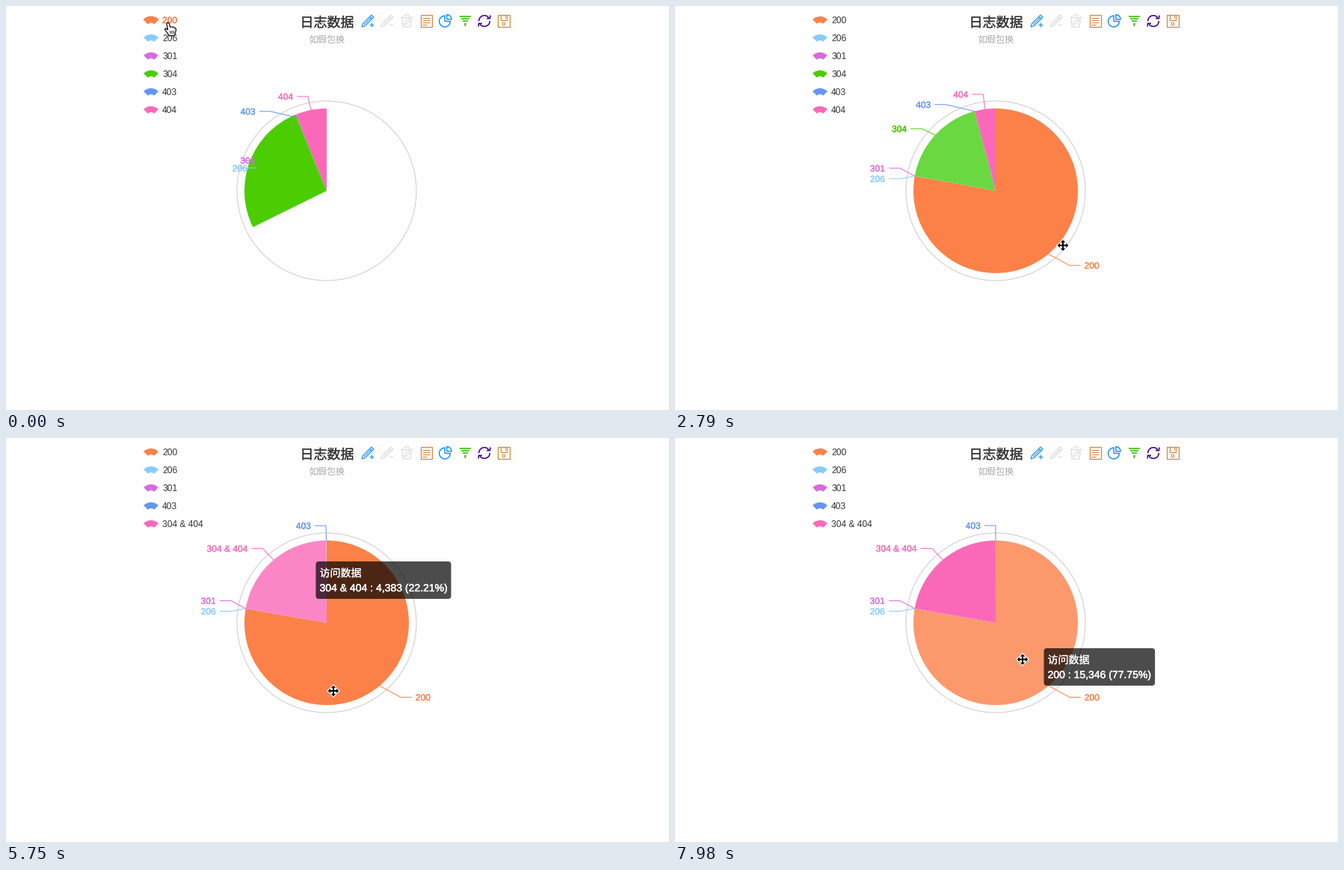
Animation of 887x540 px, one loop 8 s. Source, as a matplotlib script:

```python
import numpy as np
import matplotlib.pyplot as plt
from matplotlib import patheffects
from matplotlib.animation import FuncAnimation
from matplotlib.lines import Line2D
from matplotlib.patches import Circle, FancyBboxPatch, Polygon, Wedge

W, H, DPI = 887, 540, 64
PT = 72 / DPI                      # points per pixel
LOOP, INTERVAL, STEP = 8000, 40, 147.5
CX, CY, R = 429, 247, 110
SANS, CJK = "Liberation Sans", "Noto Sans CJK JP"

NAMES = ["200", "206", "301", "304", "403", "404"]
MERGED = "304 & 404"
COLORS = dict(zip(NAMES, ["#fb8148", "#89cbfc", "#d46ddb", "#4bcd02", "#6495f2", "#fa69b8"]))
COLORS[MERGED] = COLORS["404"]
LIGHT = {"200": "#fb996d", "304": "#6ad840", "404": "#fb86c6", MERGED: "#fb86c6"}

DATA = dict(zip(NAMES, [15346, 3, 2, 3549, 4, 834]))
TOTAL = sum(DATA.values())
VIEWS = {"all": DATA,
         "no200": {**DATA, "200": 0},
         "no404": {**DATA, "404": 0},
         "merged": {**DATA, "304": DATA["304"] + DATA["404"], "404": 0}}
CHANGES = [(-10, "all", "no200"), (590, "no200", "all"), (1900, "all", "no404"),
           (2540, "no404", "all"), (5440, "all", "merged")]

# Pointer stops (step, x, y) and hovered items (first step, last step, name)
STOPS = np.array([
    (0, 219.5, 31), (4, 219.5, 30), (8, 219.5, 132), (12, 219.5, 151), (13, 219.5, 146),
    (18, 219.5, 146), (19, 519, 320), (29, 420, 178), (31, 420, 178), (34, 394, 187),
    (37, 394, 187), (39, 438, 338), (44, 239.5, 120), (46, 239.5, 120), (50, 460, 352),
    (52, 473, 303), (53, 473, 303), (54, 465, 296)])
LEGEND_HOVER = [(0, 4, "200"), (13, 18, "404"), (43, 46, MERGED)]
SLICE_HOVER = [(19, 19, "304"), (20, 26, "200"), (27, 36, "404"),
               (37, 48, MERGED), (49, 54, "200")]
DRAG = (31, 36)

fig = plt.figure(figsize=(W / DPI, H / DPI), dpi=DPI, facecolor="#fefefe")
ax = fig.add_axes([0, 0, 1, 1])
ax.set_xlim(0, W)
ax.set_ylim(H, 0)
ax.axis("off")
live = []


def add(artist, z=1):
    artist.set_zorder(z)
    ax.add_artist(artist)
    live.append(artist)


def line(pts, color, lw=1.0, closed=False):
    pts = list(pts) + ([pts[0]] if closed else [])
    x, y = zip(*pts)
    add(Line2D(x, y, color=color, lw=lw * PT, solid_capstyle="butt", solid_joinstyle="miter"))


def shape(kind, *args, fill="none", edge="none", lw=0.0, **kw):
    add(kind(*args, facecolor=fill, edgecolor=edge, linewidth=lw * PT, **kw))


def text(x, y, s, size=12, color="#333", font=SANS, ha="left", heavy=0.0, z=1):
    t = ax.text(x, y, s, fontsize=size * PT, color=color, family=font, ha=ha,
                va="baseline", zorder=z)
    if heavy:
        t.set_path_effects([patheffects.withStroke(linewidth=heavy * PT, foreground=color)])
    live.append(t)
    return t


def arc(x, y, r, a, b):
    t = np.radians(np.linspace(a, b, 30))
    return list(zip(x + r * np.cos(t), y + r * np.sin(t)))


def box(x, y, w, h):
    return [(x, y), (x + w, y), (x + w, y + h), (x, y + h)]


def shift(pts, x, y):
    return [(x + px, y + py) for px, py in pts]


# ---- toolbar and title -------------------------------------------------

def pen(x, color, plus):
    line(shift([(-8, 8), (-6.5, 3.5), (5, -8), (8, -5), (-3.5, 6.5)], x, 20), color, 1.2, True)
    line(shift([(-5, 5), (5.5, -5.5)], x, 20), color)
    line(shift([(2.5, -5.5), (5.5, -2.5)], x, 20), color)
    line(shift([(2, 5), (8, 5)], x, 20), color, 1.2)
    if plus:
        line(shift([(5, 2), (5, 8)], x, 20), color, 1.2)


def trash(x, color):
    line(shift([(-8, -5.5), (8, -5.5)], x, 20), color, 1.4)
    line(shift([(-3.5, -6), (-2.5, -8.2), (2.5, -8.2), (3.5, -6)], x, 20), color, 1.2)
    line(shift([(-6.2, -5.5), (-5, 8), (5, 8), (6.5, -5.5)], x, 20), color, 1.3)
    line(shift([(-3.5, 5), (-2.5, 2), (2.5, -3), (4.8, -0.8), (-0.5, 4.2)], x, 20),
         color, 1.1, True)


def toolbar():
    blue, gray, tan = "#1e90ff", "#dddddd", "#d58a45"
    green, indigo = "#5cc636", "#4b0082"
    pen(484, blue, True)
    pen(510, gray, False)
    trash(536, gray)

    line(box(554.5, 12, 15, 16), tan, 1.3, True)
    for k in range(4):
        line([(557, 15.5 + 3 * k), (567 - 4 * (k == 3), 15.5 + 3 * k)], tan, 1.2)

    for x, y, r, a, b in ((587, 20.5, 7.4, 0, 270), (589.8, 17.8, 6.2, -90, 0)):
        line([(x, y)] + arc(x, y, r, a, b), blue, 1.5, True)

    for k in range(4):
        half = 7.6 - 1.95 * k
        line([(614.3 - half, 13.6 + 3.4 * k), (614.3 + half, 13.6 + 3.4 * k)], green, 2)
    shape(Circle, (614.3, 26), 1.2, fill=green)

    head = [(8, -7.5), (7.4, -3.2), (3, -3.4)]
    for s in (1, -1):
        for pts in (arc(0, 0, 7.3, 180, 325), head):
            line([(640 + s * x, 20 + s * y) for x, y in pts], indigo, 1.6)

    line(box(658, 12, 16, 16), tan, 1.3, True)
    line(box(662, 12, 8, 6.5), tan, 1.2, True)
    line([(667.5, 12.5), (667.5, 16)], tan)
    line(arc(666, 24, 1.9, 0, 360), tan, 1.2)


text(393.5, 28, "日志数据", 18, "#333", CJK, heavy=0.2)
text(405, 48.3, "如假包换", 12, "#aaa", CJK)
toolbar()
shape(Circle, (CX, CY), 120, edge="#cccccc", lw=1)
live.clear()


# ---- chart layout ------------------------------------------------------

def polar(a, r):
    t = np.radians(a)
    return CX + r * np.sin(t), CY - r * np.cos(t)


def spread(y, gap=14):
    """Move sorted label heights apart, sharing each push with the labels above."""
    for i in range(1, len(y)):
        push = y[i - 1] + gap - y[i]
        if push <= 0:
            continue
        for j in range(i, len(y)):
            y[j] += push
            if j > i and j + 1 < len(y) and y[j + 1] > y[j] + gap:
                break
        for k in range(j, -1, -1):
            y[k] -= push / 2
            if k and y[k] > y[k - 1] + gap:
                break
    return y


def layout(values):
    """Slice edges in degrees; leader points plus text anchor, and side, per label."""
    amounts = list(values.values())
    edges = np.concatenate([[0], np.cumsum(amounts)]) / TOTAL
    edges *= 360 / edges[-1]
    mids = (edges[1:] + edges[:-1]) / 2
    sides = np.where(mids < 180, 1, -1)
    heights = np.array([polar(m, 130)[1] for m in mids])
    for side in (1, -1):
        group = [i for i, v in enumerate(amounts) if v and sides[i] == side]
        group.sort(key=lambda i: heights[i])
        heights[group] = spread(list(heights[group]))

    labels = []
    for mid, y, side in zip(mids, heights, sides):
        dx, dy = abs(polar(mid, 130)[0] - CX) + 20, abs(y - CY)
        if dy < 125:
            dx = max(dx, np.sqrt((150 + 5 * side) ** 2 - dy ** 2))
        labels.append([polar(mid, R)] + [(CX + side * (dx - back), y) for back in (20, 5, 0)])
    return edges, np.array(labels), sides


LAYOUTS = {view: layout(values) for view, values in VIEWS.items()}


def chart_state(t):
    start, old, new = [c for c in CHANGES if c[0] <= t][-1]
    p = (t - start) / 500
    f = 1 - 2 ** (-10 * p) if p < 1 else 1
    (e0, l0, _), (e1, l1, sides) = LAYOUTS[old], LAYOUTS[new]
    return new, e0 + (e1 - e0) * f, l0 + (l1 - l0) * f, sides


def pointer(step):
    return np.array([np.interp(step, STOPS[:, 0], STOPS[:, k]) for k in (1, 2)])


def during(step, spans):
    """First step and name of the span holding the given step."""
    return next(((a, name) for a, b, name in spans if a <= step <= b), (0, None))


# ---- moving parts ------------------------------------------------------

def legend(view, hover):
    names = NAMES[:3] + ["403", MERGED] if view == "merged" else NAMES
    for row, name in enumerate(names):
        y, hot = 18.6 + 24 * row, name == hover
        off = VIEWS[view].get(name) == 0
        color = "#cccccc" if off and not hot else COLORS[name]
        shape(Wedge, (194, y + 9.4), 14, 225, 315, width=8,
              fill=color, edge=color if hot else "none", lw=1)
        text(209, y + 4.4, name, color=color if hot or off else "#333", heavy=0.5 * hot)


def pie(step, view, edges, labels, sides, hover):
    shown = [MERGED if view == "merged" and n == "304" else n for n in NAMES]
    active = [i for i, v in enumerate(VIEWS[view].values()) if v]
    spans = list(zip(edges[:-1] - 90, edges[1:] - 90))
    fills = [(LIGHT if n == hover else COLORS)[n] for n in shown]
    dragging = DRAG[0] <= step <= DRAG[1]

    for i in active:
        if not (dragging and shown[i] == "404") and spans[i][1] - spans[i][0] > 0.01:
            shape(Wedge, (CX, CY), R, *spans[i], fill=fills[i])

    for i in active:
        name, pts = shown[i], labels[i]
        hot = name == MERGED and 43 <= step <= 48
        line(pts[:3], COLORS[name])
        if hot:
            line(pts[:2], "#ffa040")
        x, y = pts[3]
        text(x, y + 4.3, name, color=COLORS[name], ha="left" if sides[i] > 0 else "right",
             heavy=0.5 if hot or name == "304" else 0.25)

    if dragging:
        glow = dict(edge=(1, 0.65, 0, 0.6), lw=10)
        if step < 33:
            shape(Circle, (CX, CY), 120, **glow)
        else:
            shape(Wedge, (CX, CY), R, *spans[3], **glow)
        dx, dy = pointer(step) - pointer(DRAG[0])
        shape(Wedge, (CX + dx, CY + dy), R, *spans[5], fill=fills[5])


def tooltip(step, view, since, name):
    if not name or not 1 <= step - since <= 6:
        return
    value = VIEWS[view]["304" if name == MERGED else name]
    x, y = pointer(since if name == MERGED else step - 1) + [20.5, -22]
    text(x + 5, y + 20.3, "访问数据", 14, "white", CJK, heavy=0.2, z=2)
    body = text(x + 5, y + 40, f"{name} : {value:,} ({value / TOTAL:.2%})", 14, "white",
                heavy=0.4, z=2)
    width = body.get_window_extent().width * DPI / fig.dpi + 10
    shape(FancyBboxPatch, (x, y), width, 50, boxstyle="round,pad=0,rounding_size=4",
          fill=(0, 0, 0, 0.7))


HAND = [(-4.5, -7), (-3.5, -8.7), (-2, -8.7), (-1, -7), (0, -3), (5, -2.8), (7.6, -1), (8, 1),
        (6, 8.7), (-1, 8.7), (-7, 0.6), (-6.5, -1), (-4.7, -0.6), (-3, 1)]


def four_way():
    arm, pts = [(1, -1), (1, -4), (3.2, -4), (0, -7.3), (-3.2, -4), (-1, -4)], []
    for _ in range(4):
        pts += arm
        arm = [(y, -x) for x, y in arm]
    return pts


def cursor(step):
    x, y = pointer(step)
    if np.hypot(x - CX, y - CY) < 120:
        pts = shift(four_way(), x, y)
        shape(Polygon, pts, fill="white", edge="white", lw=2.4)
        shape(Polygon, pts, fill="black")
    else:
        shape(Polygon, shift(HAND, x, y), fill="white", edge="black", lw=1.2)
        for dx in (0.2, 2.4, 4.6):
            line(shift([(dx, 2), (dx + 0.2, 6)], x, y), "black", 0.9)


def draw(i):
    for artist in live:
        artist.remove()
    live.clear()
    step = int((i * INTERVAL + 30) / STEP + 0.1)
    view, edges, labels, sides = chart_state(step * STEP)
    since, hover = during(step, SLICE_HOVER)
    legend(view, during(step, LEGEND_HOVER)[1])
    pie(step, view, edges, labels, sides, hover)
    tooltip(step, view, since, hover)
    cursor(step)
    return live


anim = FuncAnimation(fig, draw, frames=LOOP // INTERVAL, interval=INTERVAL,
                     repeat=True, repeat_delay=0, blit=False)
plt.show()
```
